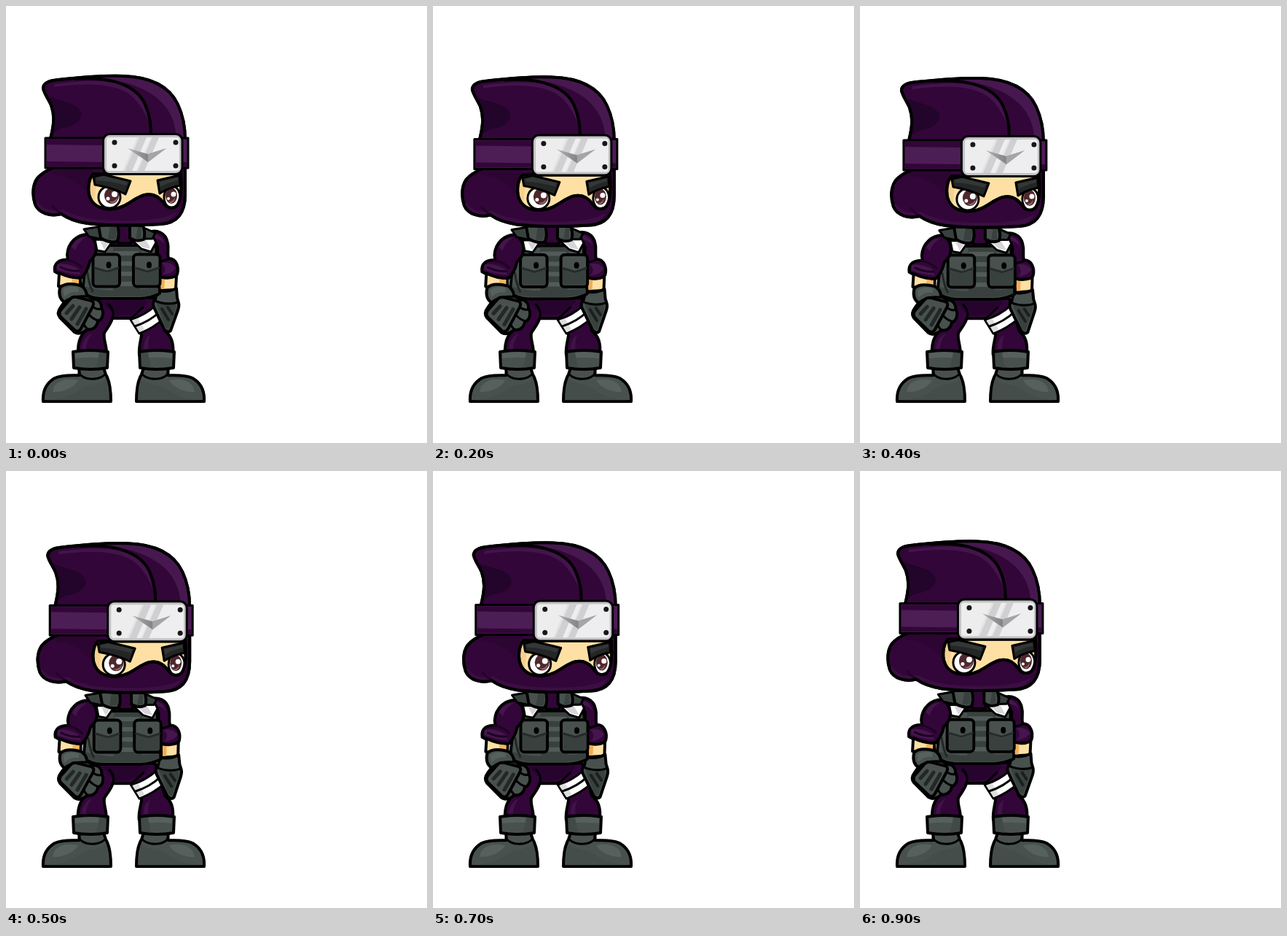
An HTML page for the animation above (1 s loop, 578 by 599 pixels).

```html
<!DOCTYPE html>
<html lang="en">
<head>
<meta charset="utf-8">
<title>Idle ninja</title>
<style>
  html, body { margin: 0; width: 100%; height: 100%; overflow: hidden; background: #fff; }
  svg { display: block; width: 100vw; height: 100vh; }
  .ink { stroke: #000; stroke-width: 4; stroke-linejoin: round; stroke-linecap: round; }
  .thin { stroke-width: 3; }
  .flat { stroke: none; }
  .line { fill: none; }
  .cloth { fill: #320638; }
  .glow { fill: #4d1d56; }
  .dim { fill: #23042a; }
  .gear { fill: #48514e; }
  .deep { fill: #39413e; }
  .shine { fill: #56605d; }
  .skin { fill: #ffe0a4; }
  .white { fill: #fff; }
</style>
</head>
<body>
<svg viewBox="0 0 578 599">
  <defs>
    <linearGradient id="mark" x2="1">
      <stop offset="0" stop-color="#b2b2b4"/><stop offset=".5" stop-color="#858588"/><stop offset="1" stop-color="#b5b5b7"/>
    </linearGradient>
    <path id="hoodShape" d="M61 182C66 162 67 150 62 136C58 127 53 121 51 113C51 105 60 102 72 101C100 98 130 95 160 96C197 97 224 109 236 135C244 152 246 168 246 184L246 258C246 284 236 298 212 299C180 301 140 301 112 298C98 296 86 292 76 285C61 289 45 284 40 272C36 260 36 246 43 236C49 229 57 225 64 222Z"/>
    <path id="faceShape" d="M120 230C112 238 112 256 116 264C121 275 134 280 148 278C166 276 175 263 190 259C203 256 211 262 217 271C222 278 231 278 235 273C241 265 241 250 240 230Z"/>
    <clipPath id="hoodClip"><use href="#hoodShape"/></clipPath>
    <clipPath id="faceClip"><use href="#faceShape"/></clipPath>
    <clipPath id="plateClip"><rect x="138" y="180" width="100" height="46" rx="4"/></clipPath>
    <g id="boot">
      <path class="gear" d="M100 496L134 496L137 505C142 513 144 526 144 542L51 542C50 527 55 517 67 510C79 505 92 507 101 506Z"/>
      <path class="flat shine" d="M66 522C72 512 86 510 99 513C94 523 77 530 64 529Z"/>
      <path class="flat deep" d="M54 541C76 538 88 536 104 524C114 518 128 519 137 512L142 541Z" opacity=".25"/>
      <path class="line thin" d="M100 503C106 513 126 514 136 505"/>
      <path class="gear" d="M92 474Q116 470 140 474L139 496Q116 500 93 496Z"/>
      <path class="flat shine" d="M95 476Q112 473 128 475L127 482Q110 481 95 483Z"/>
      <path class="flat deep" d="M128 475L138 476L137 494L124 496Z" opacity=".4"/>
    </g>
    <g id="pocket">
      <rect class="gear" x="119.500" y="340.500" width="36.500" height="44" rx="5"/>
      <path class="flat deep" d="M122 360L139 366L154 360L154 380Q153 382 150 382L126 382Q122 382 122 378Z"/>
      <path class="line thin" d="M122 359L139 364L154 359" stroke="#262c2a"/>
      <ellipse class="flat" cx="141" cy="355" rx="3.500" ry="4.500" fill="#000"/>
    </g>
  </defs>

  <g class="ink">
    <g id="legs">
      <path class="cloth" d="M117 400C123 418 126 431 116 441C104 447 98 457 99 478L138 478C139 466 133 457 135 448C139 441 144 436 146 428L172 428C175 439 186 444 186 451C185 460 182 466 183 478L229 478C231 462 227 452 218 445C214 430 208 414 204 400Z"/>
      <path class="flat glow" d="M104 470C105 459 110 452 118 449C111 458 110 466 110 472ZM189 470C189 460 192 454 198 451C195 459 195 466 196 472Z" opacity=".55"/>
      <path class="flat dim" d="M130 404L196 404C188 416 174 426 150 424Q142 418 130 404Z" opacity=".65"/>
      <path class="line thin" d="M146 429C149 420 146 414 141 409M171 428C177 424 182 419 188 413"/>
      <path class="white thin" d="M171 430Q191 424 206 410L217 428Q203 441 183 449Z"/>
      <path class="flat" fill="#dedee1" d="M173 431L181 428L190 443L183 447Z"/>
      <path class="line thin" d="M177 439Q198 432 211 419"/>
    </g>
    <use href="#boot"/>
    <use href="#boot" transform="translate(323) scale(-1 1)"/>

    <g id="armR">
      <path class="cloth" d="M193 311C207 305 220 311 222 325C224 333 221 338 223 346C234 346 238 358 235 368C230 375 218 375 208 372L196 345Z"/>
      <path class="flat glow" d="M204 313Q215 314 218 327Q212 318 202 319ZM214 352Q227 350 233 359Q228 368 214 368Q223 362 214 352Z" opacity=".7"/>
      <path class="line thin" d="M212 350Q218 349 223 347"/>
      <path class="skin" d="M210 371Q223 375 234 370L233 389L210 390Z"/>
      <path class="flat" fill="#f3ad54" d="M212 374Q216 375 218 375L217 388L212 388Z"/>
      <path class="gear" d="M208 390Q222 393 234 387L235 400L237 407Q238 411 236 417L226 445Q222 449 217 443L203 413Q200 406 205 402Z"/>
      <path class="flat deep" d="M206 406L234 406L233 417L223 443L218 440Z"/>
      <path class="line thin" d="M204 404Q222 411 236 406"/>
      <path class="line" stroke="#1b201e" d="M214 415L223 430M222 413L228 422"/>
    </g>

    <g id="torso">
      <path class="cloth" d="M114 308L196 308L208 330L208 396L109 396L111 340Z"/>
      <path class="gear" d="M122 326Q164 332 206 326C207 352 210 378 211 394Q197 401 184 401L130 401Q115 400 106 393C105 373 109 358 113 346Z"/>
      <path class="flat deep" d="M147 330L186 330L184 398L147 398Z"/>
      <path class="line" stroke="#525b58" stroke-width="6" d="M150 339L180 339M150 353L180 353M150 367L180 367M150 381L180 381"/>
      <path class="flat deep" d="M108 384Q130 391 158 390L209 387L209 393Q196 398 182 398L130 398Q118 397 108 392Z"/>
      <path class="line thin" stroke="#222826" d="M112 366Q114 382 119 391"/>
      <use href="#pocket"/>
      <use href="#pocket" x="55.500"/>
    </g>

    <g id="armL">
      <path class="cloth" d="M114 313C98 312 85 324 84 341L85 348C74 347 65 352 67 364C78 371 90 373 102 374C109 368 113 360 115 350C127 340 127 324 114 313Z"/>
      <path class="flat glow" d="M90 330Q96 317 110 317Q99 323 95 335Z" opacity=".65"/>
      <path class="flat glow" d="M70 354Q82 351 99 360L102 368Q84 367 70 361Z" opacity=".7"/>
      <path class="line thin" d="M83 348Q95 350 104 358M75 358Q88 364 100 363" stroke="#1d0323"/>
      <path class="skin" d="M73 366Q88 373 102 373L102 388L72 384Z"/>
      <path class="flat" fill="#f6b660" d="M91 374L100 375L100 386L90 385Z"/>
      <path class="gear" d="M74 386Q82 378 102 383Q110 387 111 397L121 402C128 402 132 409 131 414C135 420 133 430 126 432C125 440 118 445 112 443C106 448 100 451 94 447L74 427Q69 421 75 413L80 406Q71 400 74 386Z"/>
      <path class="flat shine" d="M78 389Q87 382 100 386L99 392Q88 390 80 399Z"/>
      <path class="line thin" d="M81 405Q92 396 111 398M118 411Q124 417 131 415M113 422Q119 429 126 431M106 434Q108 440 112 443"/>
      <path class="gear" d="M75 417L88 402Q91 398 97 399L117 404Q122 406 119 412L103 442Q99 449 93 443L75 426Q72 422 75 417Z"/>
      <path class="line" stroke="#222826" stroke-width="5" d="M92 411L83 421M101 413L90 429M110 415L98 436"/>
    </g>

    <g id="collar">
      <path class="white thin" d="M122 320L147 321L136 337L125 335ZM172 320L203 318L206 324L199 337L186 333Z"/>
      <path class="flat" fill="#d6d6da" d="M129 322L143 322L135 334ZM179 322L192 321L199 333L188 331Z"/>
      <path class="deep thin" d="M107 306L130 302L132 320L114 316ZM187 303L205 311L201 319L187 319Z"/>
      <path class="cloth thin" d="M153 300L171 300L172 325L154 325Z"/>
      <path class="gear" d="M127 301L153 300Q157 315 152 323Q140 325 130 318ZM170 300L188 301Q192 312 189 320Q179 324 170 318Z"/>
      <path class="flat deep" d="M143 302L151 302Q153 313 150 320L140 320ZM181 303L186 303L186 318L178 320Z"/>
    </g>

    <g id="head">
      <use href="#hoodShape" class="cloth"/>
      <g clip-path="url(#hoodClip)" class="flat">
        <path class="glow" d="M132 96C184 94 227 108 239 145Q246 165 244 182L234 182C233 146 212 109 132 99Z" opacity=".8"/>
        <path class="dim" d="M60 124C77 132 97 132 103 146C105 157 92 166 77 167Q66 172 58 181Z"/>
        <path class="glow" d="M66 107C105 102 150 99 174 115Q191 129 195 157Q182 127 163 117C138 105 103 106 66 111Z" opacity=".65"/>
        <path class="dim" d="M62 222L122 222Q107 238 111 256Q91 232 62 230Z" opacity=".4"/>
        <path class="glow" d="M43 268Q54 284 78 279Q103 294 153 294Q213 296 235 282Q225 299 203 299L110 298L76 286Q49 290 40 270Z" opacity=".35"/>
      </g>
      <path class="line" d="M96 100C150 96 181 112 191 135C198 150 199 163 199 180"/>
      <path class="line thin" d="M76 284Q69 281 64 274" stroke="#23042a"/>
      <use href="#hoodShape" class="line"/>

      <use href="#faceShape" class="skin"/>
      <g clip-path="url(#faceClip)">
        <path class="flat" fill="#eab66d" d="M114 230L125 240L121 270L112 258Z" opacity=".4"/>
        <ellipse class="white thin" cx="142" cy="262" rx="15" ry="15"/>
        <ellipse class="white thin" cx="228" cy="262" rx="11" ry="15"/>
        <g class="flat" fill="#4d282c">
          <ellipse cx="145" cy="260" rx="10" ry="11"/>
          <ellipse cx="227" cy="260" rx="8" ry="11"/>
        </g>
        <path class="flat" fill="#9a6d70" d="M139 266Q147 272 153 262Q152 270 145 270ZM222 266Q227 272 232 262Q231 270 226 270Z"/>
        <circle class="flat white" cx="149" cy="258" r="4"/>
        <circle class="flat white" cx="140" cy="264" r="2.500"/>
        <circle class="flat white" cx="230" cy="258" r="3.500"/>
        <circle class="flat white" cx="223" cy="264" r="2"/>
      </g>
      <use href="#faceShape" class="line"/>
      <path class="thin" fill="#242626" d="M120 234L134 231L171 240L164 258Q149 250 122 245ZM208 239L238 232L239 246Q223 249 211 257Z"/>
      <path class="flat" fill="#343737" d="M124 235L134 233L167 241L165 246Q145 240 124 239ZM211 241L236 235L236 239Q222 242 212 248Z"/>

      <path class="glow thin" d="M54 181L136 181L136 222L54 222ZM240 181L250 181L250 222L240 222Z"/>
      <path class="flat cloth" d="M56 183L135 183L135 191L56 190ZM56 213L135 214L135 220L56 220ZM243 214L248 214L248 220L243 220Z"/>
      <rect class="thin" x="133.500" y="175.500" width="108.500" height="55" rx="9" fill="#c3c3c6"/>
      <rect class="flat" x="138" y="180" width="100" height="46" rx="4" fill="#e3e3e5"/>
      <g clip-path="url(#plateClip)" class="flat">
        <path fill="#f7f7f8" d="M138 180L180 180L160 226L138 226Z" opacity=".5"/>
        <path fill="#f7f7f8" d="M193 180L199 180L179 226L173 226ZM210 180L238 180L238 226L190 226Z" opacity=".6"/>
        <path fill="#d0d0d3" d="M183 180L193 180L173 226L163 226ZM201 180L210 180L190 226L181 226Z"/>
      </g>
      <path class="flat" fill="url(#mark)" d="M167 195L195 203L220 195L195 214Z"/>
      <path class="flat" fill="#a5a5a8" d="M195 203L220 195L195 214Z"/>
      <g id="rivets" class="flat"></g>
    </g>
  </g>
</svg>
<script>
const $ = id => document.getElementById(id);

for (const x of [149, 233]) for (const y of [187, 219]) {
  const dot = document.createElementNS("http://www.w3.org/2000/svg", "circle");
  for (const [key, value] of Object.entries({ cx: x, cy: y, r: 3.5, fill: "#171718" }))
    dot.setAttribute(key, value);
  $("rivets").append(dot);
}

// Breathing amount for each tenth of the loop
const BREATH = [0, 0.15, 0.46, 0.76, 0.95, 1, 0.95, 0.76, 0.46, 0.15];
const shift = (x, y) => `translate(${x} ${y})`;
const KNEE = 458;

function pose(b) {
  const set = (id, value) => $(id).setAttribute("transform", value);
  const lean = 0.018 * b, squash = 0.013 * b;
  set("head", shift(6.2 * b, 3.2 * b));
  set("collar", shift(2 * b, 1.6 * b));
  set("torso", shift(1.3 * b, b));
  set("armL", `${shift(b, 1.3 * b)} rotate(${0.5 * b} 108 325)`);
  set("armR", `${shift(1.5 * b, 2.8 * b)} rotate(${-1.4 * b} 207 320)`);
  set("legs", `matrix(1 0 ${-lean} ${1 - squash} ${lean * KNEE} ${squash * KNEE})`);
}

function tick() {
  const step = Math.floor(performance.now() % 1000 / 100);
  pose(BREATH[step]);
  requestAnimationFrame(tick);
}
tick();
</script>
</body>
</html>
```
